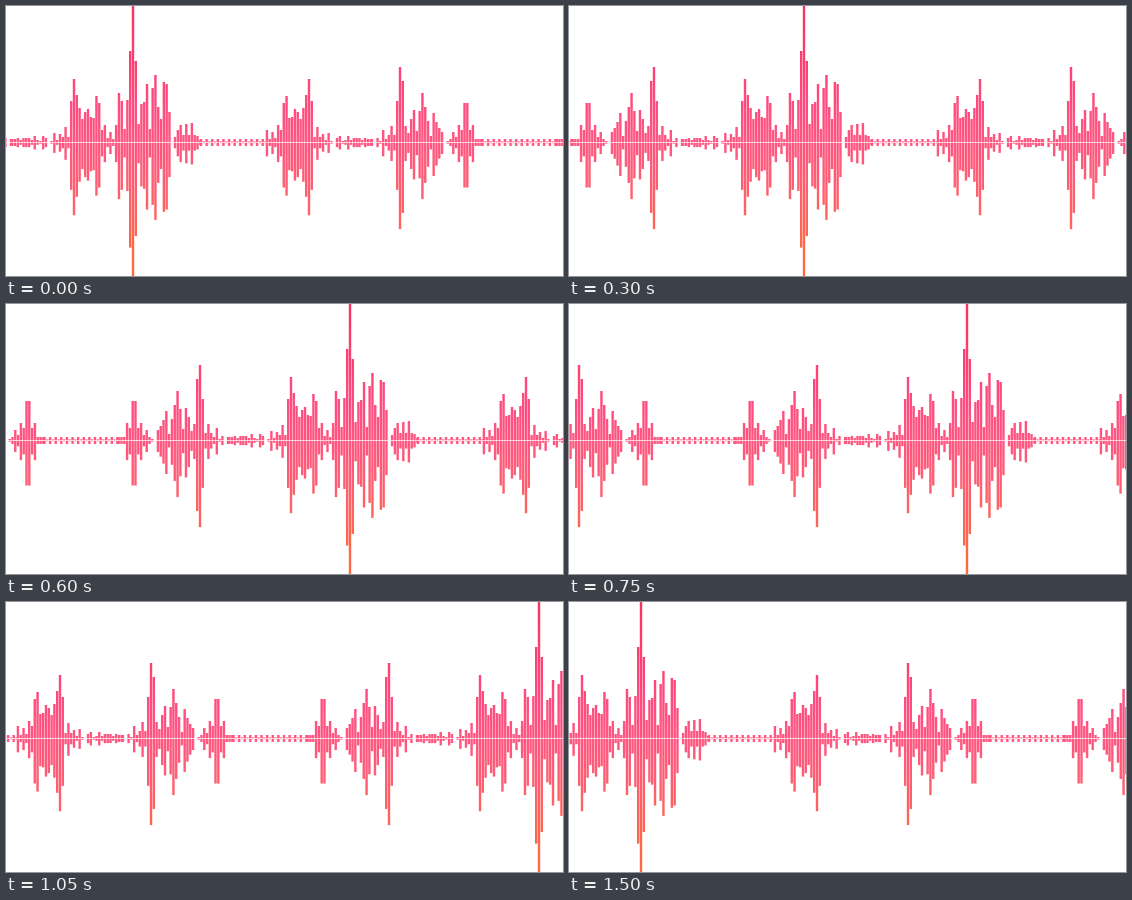
Animation of 557x270 px, one loop 1.65 s. Source, as an HTML page with a canvas:

```html
<!DOCTYPE html>
<html lang="en">
<head>
<meta charset="utf-8">
<title>Scrolling waveform</title>
<style>
  html, body { margin: 0; width: 100%; height: 100%; overflow: hidden; background: #fff; }
  canvas { display: block; }
</style>
</head>
<body>
<canvas id="wave" width="557" height="270"></canvas>
<script>
const W = 557, H = 270, MID = 136.5;
const STEP = 150, PERIOD = 655, PITCH = 2.805, BAR = 2.4, DOWN = 1.155;

// Position of the highest bar at each step
const stops = [127, 181, 235, 290, 344, 398, 479, 533, 586, 640, 727];

// Bar heights above the middle line
const swell = [3, 3, 4, 2, 4, 4, 4, 2, 6, 2, 1, 6, 4, 0, 1, 9, 2, 8, 5, 15, 5, 41,
  63, 47, 34, 23, 30, 33, 25, 24, 46, 39, 12, 17, 4, 10, 3, 12];
const spike = [17, 49, 41, 13, 42, 91, 136, 81, 18, 38, 40, 58, 13, 54, 67, 35, 23,
  60, 58, 30, 0, 5, 12, 17, 7, 18, 7, 19, 7, 6, 2];
const burst = [3, 0, 4, 1, 12, 3, 7, 16, 7, 41, 75, 61, 16, 9, 23, 32, 11, 31, 49,
  35, 21, 6, 29, 20, 14, 10, 0, 1, 3, 10, 5, 17, 12, 39, 39, 12, 17, 3, 3, 3];

const ctx = document.getElementById('wave').getContext('2d');
const paint = ctx.createLinearGradient(0, 0, 0, H);
[[0, '#f8325f'], [0.35, '#ff4a7e'], [0.5, '#ff5580'], [0.65, '#ff5d74'],
 [0.85, '#ff6650'], [1, '#ff6a3c']].forEach(([at, color]) => paint.addColorStop(at, color));

function bar(x, up) {
  if (up) ctx.fillRect(x - BAR / 2, MID - up - 0.5, BAR, up * (1 + DOWN) + 0.5);
}

// dir -1 draws the group mirrored around its peak
function group(heights, peak, x, dir = 1) {
  heights.forEach((up, i) => bar(x + dir * (i - peak) * PITCH, up));
}

function ticks(x, count) {
  for (let i = 0; i < count; i++) {
    bar(x + 2 * i * PITCH, 3);
    bar(x + (2 * i + 1) * PITCH, 0.6);
  }
}

function tile(x) {
  group(swell, 22, x - 59);
  group(spike, 6, x);
  ticks(x + 68, 12);
  group(swell, 22, x + 176, -1);
  group(burst, 10, x + 267);
  ticks(x + 349.5, 14);
  group(burst, 10, x + 505, -1);
}

function draw(step) {
  const x = stops[step];
  ctx.fillStyle = '#fff';
  ctx.fillRect(0, 0, W, H);
  ctx.fillStyle = paint;
  tile(x - PERIOD);
  tile(x);
  ctx.fillStyle = 'rgba(255, 255, 255, 0.7)';
  ctx.fillRect(0, 136, W, 1);
}

let shown = -1;
const start = performance.now();
function tick() {
  const step = Math.floor((performance.now() - start) / STEP) % stops.length;
  if (step !== shown) draw(shown = step);
  requestAnimationFrame(tick);
}
tick();
</script>
</body>
</html>
```
